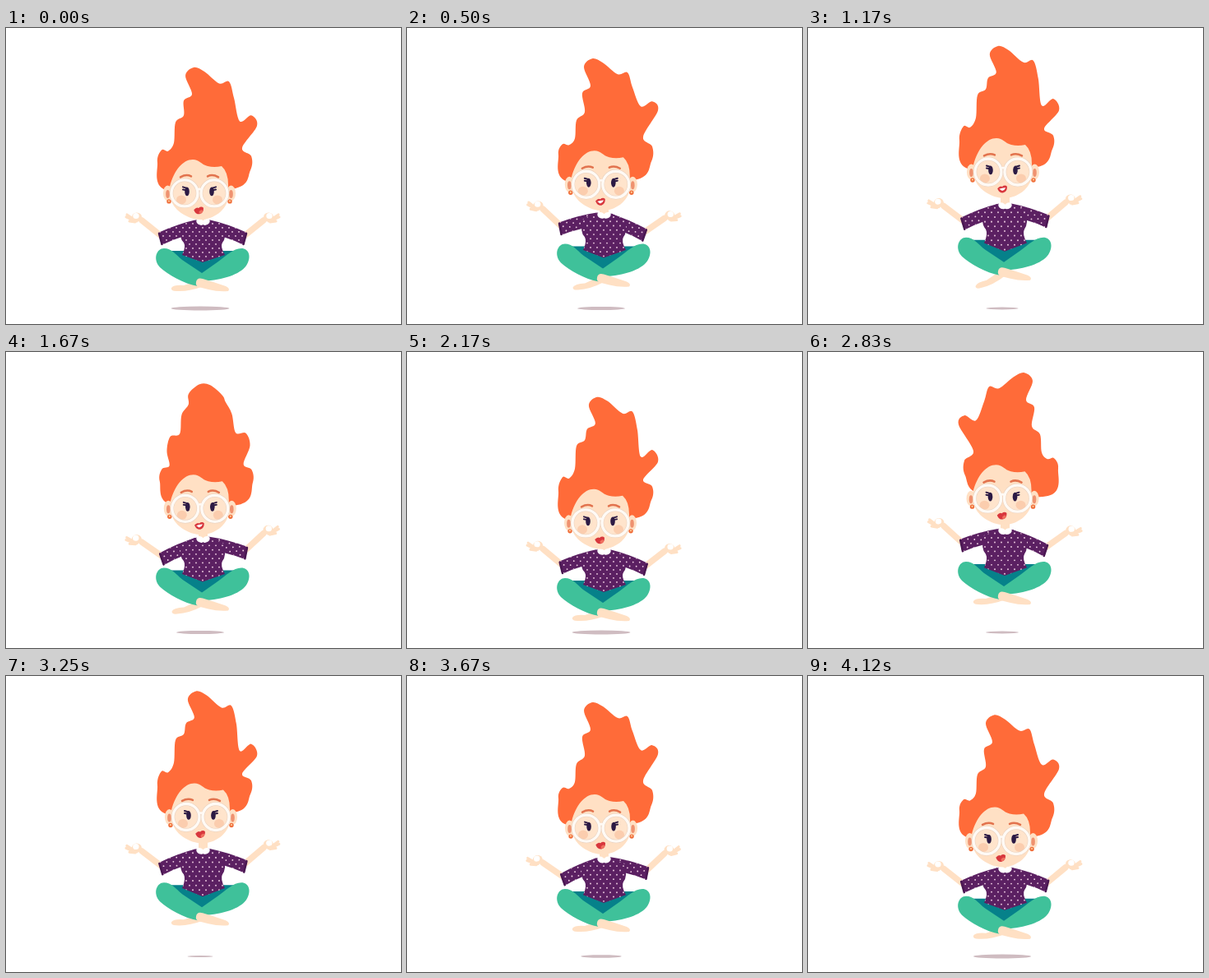
An HTML page with a canvas for the animation above (4.17 s loop, 480 by 360 pixels).

```html
<!DOCTYPE html>
<html>
<head>
<meta charset="utf-8">
<style>
html, body { margin: 0; height: 100%; overflow: hidden; background: #fff; }
canvas { display: block; }
</style>
</head>
<body>
<canvas id="stage" width="480" height="360"></canvas>
<script>
const g = document.getElementById('stage').getContext('2d');
const LOOP = 4170, BREATH = LOOP / 2, WAVE = LOOP / 4;
const SKIN = '#ffe0c4', HAIR = '#ff6b39', SHIRT = '#5b2062', GREEN = '#3fc19a', TEAL = '#06818a';

// Flame of hair from the left ear over the tip to the right ear; y is relative to the eyes.
const FLAME = [[194, -4], [184, -36], [189, -49], [197, -48], [204, -56], [206, -78], [216, -88], [213, -111],
  [223, -120], [215, -143], [225, -153], [238, -148], [256, -134], [268, -136], [274, -118], [284, -95],
  [298, -101], [305, -90], [287, -58], [298, -46], [297, -28], [279, -6]];

const mix = (a, b, k) => a + (b - a) * k;

// Smooth bump around a point of a cycle that runs from 0 to 1.
function pulse(p, center, reach = .2) {
  const d = Math.abs((p - center + 1.5) % 1 - .5);
  return d < reach ? Math.cos(d / reach * Math.PI / 2) ** 2 : 0;
}

// The locks slide up on the left and down on the right, then the flame flips over.
function hairPoints(p) {
  const slide = pulse(p, .1), flip = pulse(p, .715);
  const locks = FLAME.map(([x, y]) => {
    const side = x < 240 ? -1 : 1;
    const bump = Math.exp(-(((y + 81 + 6 * side) / 28) ** 2));
    return [x + (y < -105 ? 6 * slide : 0), y + side * 16 * bump * slide];
  });
  return locks.map(([x, y], i) => {
    const [mx, my] = locks[locks.length - 1 - i];
    return [mix(x, 488 - mx, flip), mix(y, my, flip)];
  });
}

// Closed smooth outline through points.
function blob(points, color) {
  const at = i => points.at(i % points.length);
  g.beginPath();
  g.moveTo(...points[0]);
  points.forEach((b, i) => {
    const a = at(i - 1), c = at(i + 1), d = at(i + 2);
    g.bezierCurveTo(b[0] + (c[0] - a[0]) / 6, b[1] + (c[1] - a[1]) / 6,
      c[0] - (d[0] - b[0]) / 6, c[1] - (d[1] - b[1]) / 6, c[0], c[1]);
  });
  g.fillStyle = color;
  g.fill();
}

function shape(d, color) {
  g.fillStyle = color;
  g.fill(new Path2D(d));
}

function line(d, color, width) {
  g.strokeStyle = color;
  g.lineWidth = width;
  g.lineCap = 'round';
  g.stroke(new Path2D(d));
}

function oval(x, y, rx, ry, color, angle = 0) {
  g.beginPath();
  g.ellipse(x, y, rx, ry, angle, 0, 7);
  g.fillStyle = color;
  g.fill();
}

function ring(x, y, r, color, width) {
  g.beginPath();
  g.arc(x, y, r, 0, 7);
  g.strokeStyle = color;
  g.lineWidth = width;
  g.stroke();
}

function group(x, y, draw) {
  g.save();
  g.translate(x, y);
  draw();
  g.restore();
}

function dotted(d) {
  shape(d, SHIRT);
  group(0, 0, () => {
    g.clip(new Path2D(d));
    for (let row = 0; row < 12; row++)
      for (let x = -64 + row % 2 * 4; x < 64; x += 8) oval(x, row * 5 - 2, .9, .9, '#f3d3e6');
  });
}

function legs(tilt) {
  shape('M199 271L240 303L279 271Z', TEAL);
  group(240, 313, () => {
    g.rotate(-tilt);
    shape('M-39 3Q-36 -1 -24 0L-8 -5L0 1Q-18 8 -33 7Q-40 7 -39 3Z', SKIN);
  });
  shape('M192 268C201 268 207 276 214 282L244 302L233 314C216 311 197 300 187 291C178 281 183 268 192 268Z', GREEN);
  shape('M286 268C276 268 268 277 258 284L231 303Q230 309 240 308C264 306 284 300 292 289C299 278 295 268 286 268Z', GREEN);
  shape('M231 309Q232 303 239 305L252 309L267 314Q273 317 270 320Q258 321 246 318L234 315Q230 313 231 309Z', SKIN);
}

function arm() {
  line('M-48 20L-74 -1', SKIN, 7.5);
  line('M-80 0L-92 -8M-82 0L-93 -5M-82 1L-89 0', SKIN, 3);
  oval(-80, -5, 6, 5.5, SKIN);
  oval(-81, -6.5, 3.7, 3.5, '#fff');
  dotted('M-7 -2Q-30 3 -54 14L-50 29Q-38 23 -25 19L-8 22Z');
  line('M-53 15L-49.5 28', '#4a1752', 2.5);
}

function faceHalf(side) {
  group(0, 0, () => {
    g.scale(side, 1);
    oval(18, 0, 15, 15, '#ffe4cc');
    oval(22, 8, 6, 5.5, '#fbcdae');
    oval(15, -2, 2.8, 5.4, '#2c1a44');
    line('M15 -6L20 -7.5M17 -4L20 -4.5', '#2c1a44', 2);
    ring(18, 0, 16, '#e8d0be', 4.4);
    ring(18, 0, 16, '#fffaf5', 3.4);
    line('M10 -20.5Q16 -23.5 23 -19.5', '#e2734e', 2.5);
  });
}

function head(teeth) {
  for (const side of [-1, 1]) {
    oval(side * 38.5, 0, 5.5, 9.5, SKIN);
    oval(side * 38.5, 1, 2.3, 5, '#ef9270');
    oval(side * 37, 10, 2.7, 2.7, '#f0703c');
    oval(side * 37, 9.5, 1, 1, '#ffd9a8');
  }
  shape('M-36 -8C-31 -28 -20 -41 -8 -41C0 -41 2 -35 10 -33Q18 -31 27 -33Q35 -26 35 -10V4C34 21 16 32 2 32C-14 32 -34 20 -35 4Z', SKIN);
  faceHalf(-1);
  faceHalf(1);
  line('M-2.5 -4Q0 -6 2.5 -4', '#fffaf5', 2.5);
  group(-.5, 21, () => {
    g.rotate(-.2);
    shape('M-6 -2Q-2 -5 0 -3Q4 -5 6 -2Q5 4 0 4.5Q-5 4 -6 -2Z', '#d8373d');
    if (teeth) shape('M-4 -1Q0 -2 4 -1Q2 2 -1 2Z', '#fff');
    else oval(2, 2, 2.6, 1.8, '#f0705f', -.4);
  });
}

function draw(t) {
  const phase = t / BREATH * 2 * Math.PI;
  const breath = (1 - Math.cos(phase - .127)) / 2;
  const first = t < BREATH;
  const rise = first ? 13.5 : 17;
  const dip = 7 * Math.exp(-(((t - 2170) / 150) ** 2));
  const lift = dip - rise * breath;
  const headY = 201 + lift - 13 * breath, neckY = 235 + lift - 6.5 * breath;
  const width = 71 - 2.4 * rise * breath;

  g.fillStyle = '#fff';
  g.fillRect(0, 0, 480, 360);
  oval(236, 341, width / 2, width / 28, '#cfbcc1');

  group(0, headY, () => blob(hairPoints(t / WAVE % 1), HAIR));
  group(0, lift, () => legs(first ? .3 * breath : 0));

  group(239, neckY, () => {
    group(0, 0, () => {
      g.rotate(.075 * Math.sin(phase));
      arm();
      g.scale(-1, 1);
      arm();
    });
    group(0, 0, () => {
      g.scale(1, 1 + .13 * breath);
      dotted('M-10 -1L-26 6Q-29 21 -23 26Q-20 31 -25 41L0 50L27 41Q21 31 24 26Q29 21 26 6L10 -1Z');
    });
    shape('M-5 -12H6V0Q0 5 -5 0Z', SKIN);
    oval(-3, 1, 5, 3.6, '#fff', .5);
    oval(4, 1, 5, 3.6, '#fff', -.5);
  });

  group(235 + 2 * breath, headY, () => head(first && breath > .3));
}

function tick() {
  draw(performance.now() % LOOP);
  requestAnimationFrame(tick);
}
tick();
</script>
</body>
</html>
```
